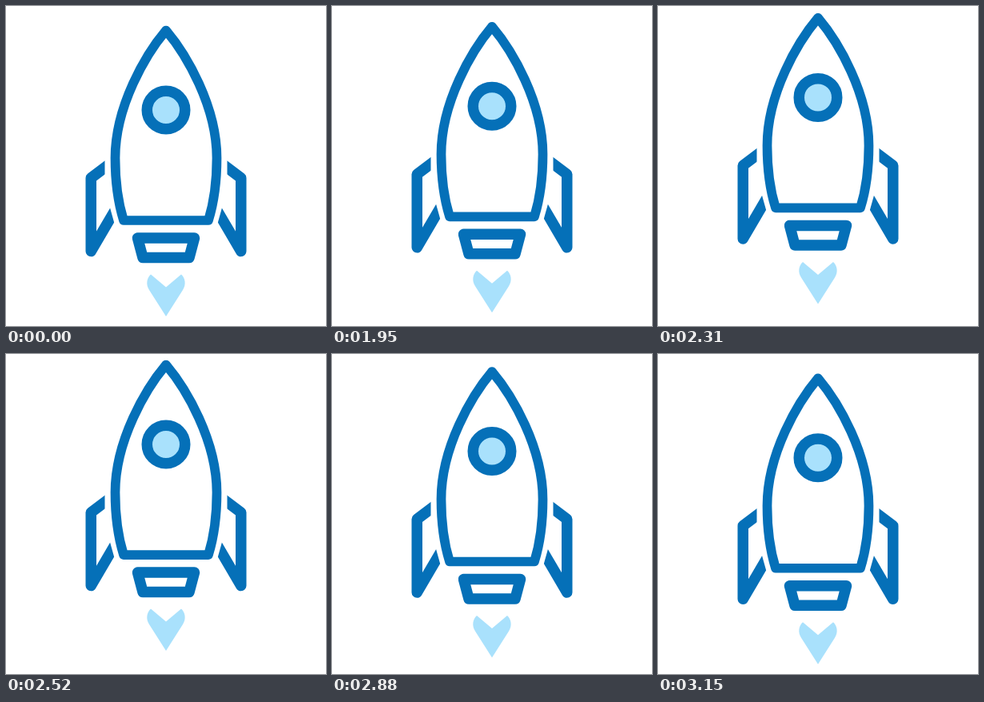
These frames come from a looping animation (400x400 px, 3.18 s). An HTML page with a canvas:

```html
<!DOCTYPE html>
<html lang="en">
<head>
<meta charset="utf-8">
<title>Rocket</title>
<style>
  html, body { margin: 0; width: 100%; height: 100%; overflow: hidden; background: #fff; }
  canvas { display: block; width: 400px; height: 400px; }
</style>
</head>
<body>
<canvas id="stage" width="400" height="400"></canvas>
<script>
const ctx = document.getElementById('stage').getContext('2d');
const BLUE = '#0570b8', LIGHT = '#a9e1fc';
const LOOP = 3180, STEP = 30, LIFTOFF = 1800, PEAK = 2580, HEIGHT = 17;

const body = new Path2D(`M200 30.5 C175 60 136.5 125 136.5 190 C136.5 220 140.5 247 147 268
  H253 C259.5 247 263.5 220 263.5 190 C263.5 125 225 60 200 30.5 Z`);
const fin = new Path2D('M140.1 189.5 L106.25 215 V306.5 L144.2 241.8');
const finArea = new Path2D('M90 180 H123.5 V229 L149 320 H90 Z');
const nozzle = new Path2D('M164.5 290 H235.5 L229 314.5 H171 Z');
const flame = new Path2D(`M200 351.5 L181 335.5 C176 340 174.5 348 179 355 L200 388
  L221 355 C225.5 348 224 340 219 335.5 Z`);

// Cubic-bezier easing, solved by bisection.
function bezier(x1, y1, x2, y2) {
  const at = (a, b, s) => 3 * a * s * (1 - s) ** 2 + 3 * b * s * s * (1 - s) + s ** 3;
  return x => {
    let lo = 0, hi = 1;
    for (let i = 0; i < 30; i++) {
      const mid = (lo + hi) / 2;
      if (at(x1, x2, mid) < x) lo = mid; else hi = mid;
    }
    return at(y1, y2, (lo + hi) / 2);
  };
}
const rise = bezier(0.25, 0.1, 0.25, 1);
const fall = bezier(0.3, 0, 0.65, 0.93);

function lift(t) {
  if (t <= LIFTOFF) return 0;
  if (t < PEAK) return HEIGHT * rise((t - LIFTOFF) / (PEAK - LIFTOFF));
  return HEIGHT * (1 - fall((t - PEAK) / (LOOP - PEAK)));
}

function outline(path, width) {
  ctx.lineWidth = width;
  ctx.stroke(path);
}

function drawFin(mirrored) {
  ctx.save();
  if (mirrored) {
    ctx.translate(400, 0);
    ctx.scale(-1, 1);
  }
  ctx.clip(finArea);
  outline(fin, 13.5);
  ctx.restore();
}

function drawWindow() {
  const circle = new Path2D();
  circle.arc(200, 130, 23.75, 0, Math.PI * 2);
  ctx.fill(circle);
  outline(circle, 13.5);
}

function draw(now) {
  const t = Math.floor((now % LOOP) / STEP) * STEP;
  ctx.fillStyle = '#fff';
  ctx.fillRect(0, 0, 400, 400);
  ctx.save();
  ctx.translate(0, -lift(t));
  ctx.lineJoin = 'round';
  ctx.strokeStyle = BLUE;
  ctx.fillStyle = LIGHT;
  ctx.fill(flame);
  drawFin(false);
  drawFin(true);
  outline(nozzle, 13.5);
  outline(body, 11.7);
  drawWindow();
  ctx.restore();
}

const start = performance.now();
function tick() {
  draw(performance.now() - start);
  requestAnimationFrame(tick);
}
tick();
</script>
</body>
</html>
```
